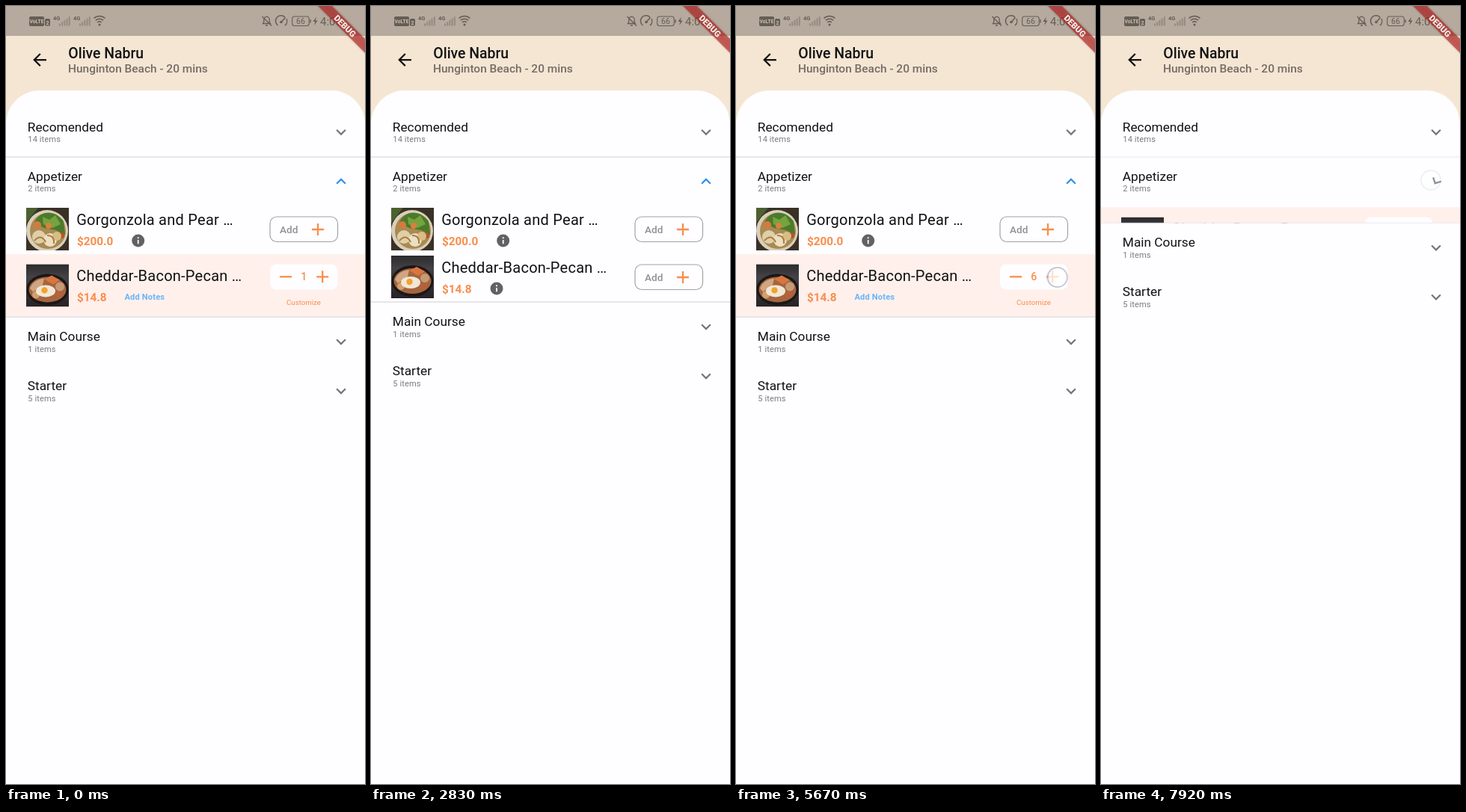
An HTML page for the animation above (8 s loop, 480 by 1041 pixels).

```html
<!DOCTYPE html>
<html lang="en">
<head>
<meta charset="utf-8">
<title>Menu</title>
<style>
html, body { margin: 0; width: 100%; height: 100%; overflow: hidden; background: #fefdff; }
svg { display: block; width: 100vw; height: 100vh; font-family: Roboto, sans-serif; }
.title { font-size: 17.3px; fill: #121212; }
.sub { font-size: 11.1px; letter-spacing: .1px; fill: #7c7c7e; }
.name { font-size: 20px; letter-spacing: .25px; fill: #121212; }
.price { font-size: 15.3px; font-weight: 700; fill: #f98d4b; }
.sign { stroke: #f98d4b; stroke-width: 2.3; fill: none; }
.line { stroke: #e0dfe3; stroke-width: 1.3; }
.bar { fill: #665e55; }
</style>
</head>
<body>
<svg id="stage" viewBox="0 0 480 1041" preserveAspectRatio="none">
  <defs>
    <clipPath id="reveal"><rect id="window" x="0" y="268" width="480" height="148"/></clipPath>
    <clipPath id="frame"><rect width="57" height="57"/></clipPath>
    <linearGradient id="slate" x2="0" y2="1">
      <stop offset="0" stop-color="#2b2a2c"/><stop offset=".3" stop-color="#444245"/><stop offset="1" stop-color="#272225"/>
    </linearGradient>
    <filter id="soft"><feGaussianBlur stdDeviation="3"/></filter>
    <path id="chevron" d="M4.59-3.41 0 1.17-4.59-3.41-6-2 0 4 6-2z" transform="scale(1.11)"/>
    <path id="plus" class="sign" d="M-8 0H8M0-8V8"/>
  </defs>

  <rect width="480" height="1041" fill="#fefdff"/>
  <rect width="480" height="160" fill="#f5e6d4"/>
  <rect width="480" height="40" fill="#b5aa9d"/>
  <path d="M0 158A45 45 0 0 1 45 113H435A45 45 0 0 1 480 158V170H0z" fill="#fefdff"/>

  <path transform="translate(31.7 58.7) scale(1.11)" fill="#111" d="M20 11H7.83l5.59-5.59L12 4l-8 8 8 8 1.41-1.41L7.83 13H20z"/>
  <text x="83.3" y="69.5" font-size="19.4" font-weight="500" fill="#121212">Olive Nabru</text>
  <text x="83" y="89" font-size="15.45" font-weight="500" fill="#756c66">Hunginton Beach - 20 mins</text>

  <g class="bar" id="status">
    <rect x="31" y="14" width="20" height="13" rx="2"/>
    <text x="41" y="23" font-size="6.7" font-weight="700" text-anchor="middle" fill="#c9beb1">VoLTE</text>
    <rect x="52" y="17" width="7" height="9.5" rx="1.5"/>
    <text x="55.5" y="24.5" font-size="7" font-weight="700" text-anchor="middle" fill="#c9beb1">2</text>
    <g fill="none" stroke="#665e55" stroke-width="1.5">
      <path d="M117.5 16.5a11 11 0 0 1 15 0M119.8 19.3a7.5 7.5 0 0 1 10.4 0M122.2 22a4 4 0 0 1 5.6 0"/>
      <path d="M343.5 23.5h10l-1.3-2.2v-3.3a3.7 3.7 0 0 0-7.4 0v3.3zM347 26h3M342.5 14l12.5 12.5" stroke-width="1.3"/>
      <path d="M363.5 26a7.3 7.3 0 1 1 9.5-11M375 17a7.3 7.3 0 0 1-2 9M367.5 22l6-6.5"/>
      <rect x="382.7" y="14" width="22.5" height="12.5" rx="3" stroke-width="1.1"/>
      <path d="M407 18v4.5" stroke-width="1.4"/>
    </g>
    <circle cx="125" cy="25" r="1.5"/>
    <circle cx="368" cy="21.5" r="1.8"/>
    <path d="M415 14.5l-4.5 6.5h3l-1.5 5 4.7-6.5h-3z"/>
    <text x="394" y="24.3" font-size="10.5" text-anchor="middle">66</text>
    <text x="420" y="25.5" font-size="15">4:05</text>
  </g>

  <g id="list"></g>

  <g transform="translate(480 0) rotate(45)">
    <rect x="-60" y="31.1" width="120" height="13.3" fill="#000" opacity=".18" filter="url(#soft)"/>
    <rect x="-60" y="31.1" width="120" height="13.3" fill="#b71c1c" fill-opacity=".63"/>
    <text y="41.8" font-size="11.3" font-weight="900" text-anchor="middle" fill="#f4eeea">DEBUG</text>
  </g>
  <g id="touches"></g>
</svg>
<script>
const $ = id => document.getElementById(id);
const LOOP = 8000, FPS = 12, TOP = 268, ROW = 64, CHOSEN = 84;
const CLOSE_AT = 7782, CLOSE_MS = 200;

// down, up, x, y, quantity afterwards
const taps = [
  [2310, 2480, 366, 367, 0],
  [3080, 3320, 424, 374, 1],
  [4330, 4500, 423, 363, 2],
  [4700, 4830, 423, 362, 3],
  [5165, 5250, 426, 363, 4],
  [5330, 5420, 428, 363, 5],
  [5495, 5585, 429, 363, 6],
  [5660, 5750, 430, 363, 7],
  [5840, 5930, 429, 364, 8],
  [6020, 6110, 428, 364, 9],
  [6200, 6290, 427, 365, 10],
  [6380, 6470, 425, 365, 11],
  [6570, 6660, 425, 365, 12],
  [6750, 6850, 425, 365, 13],
  [7720, CLOSE_AT, 441, 233, 13]
];

const header = (y, title, sub, id = '') => `
  <text class="title" x="28.8" y="${y + 31.5}">${title}</text>
  <text class="sub" x="29.3" y="${y + 46}">${sub}</text>
  <g id="${id}" transform="translate(448 ${y + 32.7})" fill="#757578"><use href="#chevron"/></g>`;

const dot = (x, y, r, fill) => `<circle cx="${x}" cy="${y}" r="${r}" fill="${fill}"/>`;

const salad = `
  <rect width="57" height="57" fill="#3a3126"/>
  <path d="M0 0H16L0 20z" fill="#4c6130"/>
  ${dot(28, 31, 28, '#d9cfba')}${dot(29, 31, 24, '#a98a52')}
  <path d="M11 20C18 3 38 2 50 18L52 36 40 30 24 27z" fill="#4c7a2b"/>
  <path d="M22 12l9 4 8-6 7 12-11 5-12-5z" fill="#76a33f"/>
  ${dot(15, 23, 5, '#d37a40')}${dot(30, 24, 4, '#d9803f')}${dot(47, 37, 4, '#b5552c')}
  ${dot(17, 39, 9, '#dfcfa8')}${dot(32, 43, 9, '#ecdfc2')}${dot(41, 38, 6, '#d8bd85')}
  <path d="M11 44q9-10 15 2M28 37q10 0 9 11" fill="none" stroke="#a87c40" stroke-width="2"/>`;

const ramen = `
  <rect width="57" height="57" fill="url(#slate)"/>
  <ellipse cx="28.5" cy="34" rx="28" ry="21" fill="#1b1718"/>
  <ellipse cx="28.5" cy="34" rx="25" ry="17" fill="#a4653f"/>
  <path d="M5 32q5-12 19-13l-2 9-13 9z" fill="#cfa681"/>
  <path d="M24 20l10-5 11 6-9 6z" fill="#d9763f"/>
  ${dot(45, 30, 6, '#c79a76')}${dot(13, 41, 5, '#d1a06c')}${dot(43, 41, 5, '#b4623a')}
  <ellipse cx="26" cy="36" rx="13" ry="8" fill="#f2e6d6"/>
  ${dot(24.5, 35, 4.2, '#f0a32e')}`;

const item = (dy, photo, name, price) => `<g transform="translate(0 ${dy})">
  <g transform="translate(27 270)" clip-path="url(#frame)">${photo}</g>
  <text class="name" x="94.2" y="292.5">${name}</text>
  <text class="price" x="95" y="319.5">${price}</text></g>`;

const addButton = (dy, infoX) => `<g transform="translate(0 ${dy})">
  ${dot(infoX, 314, 8.5, '#626264')}
  <path d="M${infoX} 313v5.3M${infoX} 309.2v2" stroke="#fefdff" stroke-width="1.8"/>
  <rect x="353" y="282" width="90.5" height="33.5" rx="9" fill="#fefdff" stroke="#a2a2a5" stroke-width="1.2"/>
  <text x="366" y="304" font-size="13.6" font-weight="500" fill="#929295">Add</text>
  <use href="#plus" x="417" y="299"/></g>`;

const second = ['Cheddar-Bacon-Pecan …', '$14.8'];

$('list').innerHTML = `
  ${header(136, 'Recomended', '14 items')}
  ${header(202, 'Appetizer', '2 items', 'arrow')}
  <g clip-path="url(#reveal)"><g id="rows">
    ${item(0, salad, 'Gorgonzola and Pear …', '$200.0')}${addButton(0, 176.7)}
    <g id="plain">${item(ROW, ramen, ...second)}${addButton(ROW, 168)}</g>
    <g id="chosen">
      <rect y="332" width="480" height="84" fill="#fff0ec"/>
      ${item(75.4, ramen, ...second)}
      <text x="158.5" y="392.6" font-size="11.1" font-weight="700" letter-spacing=".15" fill="#69b5f7">Add Notes</text>
      <rect x="353" y="345.5" width="90.5" height="34" rx="8" fill="#fefdff"/>
      <path id="minus" class="sign" d="M-8 0H8"/>
      <text id="count" x="398.2" y="367.3" font-size="14" font-weight="500" text-anchor="middle" fill="#f98d4b"></text>
      <use id="more" href="#plus"/>
      <text x="398" y="400" font-size="9.7" text-anchor="middle" fill="#f98d4b">Customize</text>
    </g>
  </g></g>
  <path class="line" id="upper" d="M0 202H480"/>
  <g id="below">
    <path class="line" id="lower" d="M0 416H480"/>
    ${header(416.5, 'Main Course', '1 items')}
    ${header(482.5, 'Starter', '5 items')}
  </g>`;

$('status').insertAdjacentHTML('beforeend', [63, 90].map(x =>
  `<text x="${x}" y="19" font-size="7.5" font-weight="700">4G</text>` +
  [0, 1, 2, 3, 4].map(i => `<rect x="${x + 8 + i * 3.2}" y="${23.5 - i * 2.3}" width="2" height="${3 + i * 2.3}" fill-opacity=".4"/>`).join('')
).join(''));

$('touches').innerHTML = taps.map(([, , x, y]) =>
  `<circle cx="${x}" cy="${y}" r="13" fill="#fff" fill-opacity=".58" stroke="#8a8da8" stroke-opacity=".46" stroke-width="1.6"/>`).join('');
const rings = [...$('touches').children];

const clamp = v => Math.min(1, Math.max(0, v));
const mix = (a, b, k) => `rgb(${a.map((v, i) => Math.round(v + (b[i] - v) * k))})`;
const move = (id, x, y) => $(id).setAttribute('transform', `translate(${x} ${y})`);

// cubic-bezier(.42, 0, 1, 1)
function easeIn(x) {
  let lo = 0, hi = 1;
  for (let i = 0; i < 24; i++) {
    const s = (lo + hi) / 2, r = 1 - s;
    if (1.26 * s * r * r + 3 * s * s * r + s ** 3 < x) lo = s; else hi = s;
  }
  return lo * lo * (3 - 2 * lo);
}

function draw(t) {
  let n = 1;
  taps.forEach(([down, up, , , after], i) => {
    if (t >= up) n = after;
    rings[i].setAttribute('opacity', t < down ? 0 : clamp(1 - (t - up) / 200));
  });

  $('plain').style.display = n ? 'none' : '';
  $('chosen').style.display = n ? '' : 'none';
  $('count').textContent = n;
  const spread = n > 9 ? 2 : 0;
  move('minus', 374 - spread, 362.3);
  move('more', 423.2 + spread, 362.3);

  const open = clamp(1 - (t - CLOSE_AT) / CLOSE_MS);
  const k = open === 1 ? 1 : easeIn(open);
  const full = ROW + (n ? CHOSEN : ROW), shown = full * k;
  $('window').setAttribute('height', shown);
  move('rows', 0, (shown - full) / 2);
  move('below', 0, TOP + shown - 416);
  const edge = 1 - (1 - open) ** 1.7;
  $('upper').setAttribute('opacity', edge);
  $('lower').setAttribute('opacity', edge);
  $('arrow').setAttribute('transform', `translate(448 234.7) rotate(${180 * k})`);
  $('arrow').setAttribute('fill', mix([117, 117, 120], [48, 145, 235], k));
}

// The screen refreshes 12 times a second; the small lead absorbs timer rounding.
const start = performance.now();
function tick() {
  const t = (performance.now() - start) % LOOP;
  const step = Math.min(Math.floor((t + 5) * FPS / 1000), LOOP * FPS / 1000 - 1);
  draw(step * 1000 / FPS);
  requestAnimationFrame(tick);
}
tick();
</script>
</body>
</html>
```
